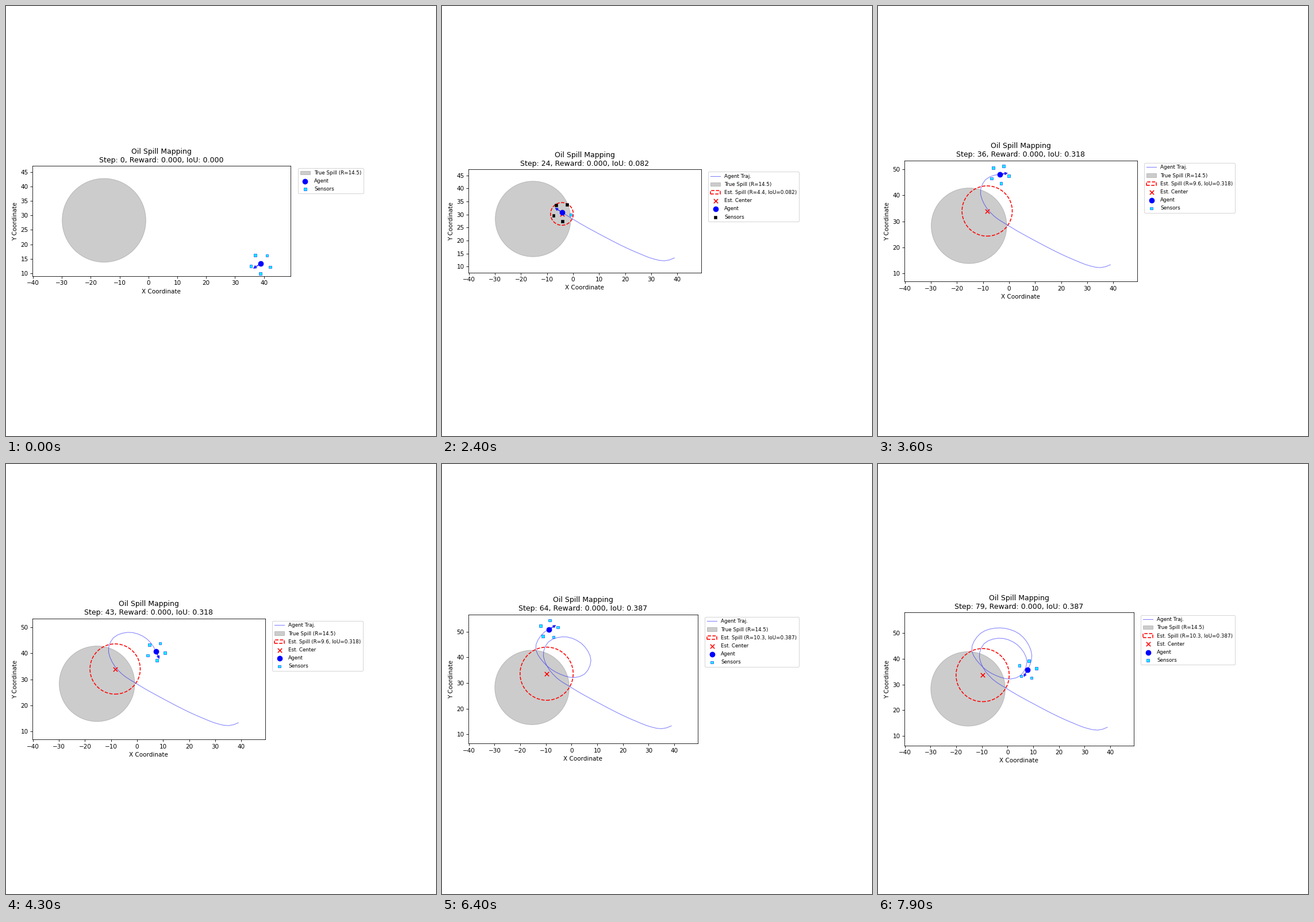
A matplotlib script for the animation above (8 s loop, 748 by 748 pixels).

```python
import numpy as np
import matplotlib.pyplot as plt
from matplotlib.animation import FuncAnimation
from matplotlib.patches import Circle

STEPS = 80
SPILL, SPILL_R = np.array([-15.4, 28.3]), 14.5
SENSOR_R = 3.5
SENSOR_ANGLES = -np.pi / 2 + 2 * np.pi * np.arange(5) / 5
START_HEADING = np.radians(214)

# Key points of the agent's route: approach, inner loop, outer loop.
ROUTE = np.array([
    (38.87, 13.34), (35, 12.23), (31, 12.92), (25.05, 15.17), (9.7, 22.7),
    (0, 28.2), (-6.2, 32.4), (-9.5, 36.5), (-11, 41.6), (-9.25, 45.8),
    (-3.1, 48.05), (4.4, 44.95), (7.55, 38.75), (4.85, 33.35), (1.2, 32.15),
    (-4.4, 33.45), (-10, 37.1), (-14, 44), (-10.5, 49.95), (-3.5, 52.05),
    (5, 49.4), (9.45, 40.9), (7.75, 35.75),
])

# Estimate: grows while the spill is crossed, then jumps on re-entry.
EST_STEPS = [22, 30, 57, 58]
EST_X = [-2.93, -8.42, -8.45, -9.72]
EST_Y = [29.0, 33.97, 33.96, 33.66]
EST_R = [2.6, 9.64, 9.64, 10.34]


def arc_length(points):
    return np.r_[0, np.cumsum(np.hypot(*np.diff(points, axis=0).T))]


def spline(points, samples=4000):
    """Cubic Hermite curve through the points, by chord length."""
    t = arc_length(points)
    slope = np.gradient(points, t, axis=0, edge_order=2)
    u = np.linspace(0, t[-1], samples)
    i = np.clip(np.searchsorted(t, u, "right") - 1, 0, len(t) - 2)
    h = (t[i + 1] - t[i])[:, None]
    s = (u - t[i])[:, None] / h
    return ((1 + 2 * s) * (1 - s) ** 2 * points[i]
            + s * (1 - s) ** 2 * h * slope[i]
            + s ** 2 * (3 - 2 * s) * points[i + 1]
            + s ** 2 * (s - 1) * h * slope[i + 1])


def even_steps(curve, count):
    """Points at constant speed along the curve."""
    dist = arc_length(curve)
    at = np.linspace(0, dist[-1], count)
    return np.stack([np.interp(at, dist, axis) for axis in curve.T], axis=1)


path = even_steps(spline(ROUTE), STEPS)
moves = np.diff(path, axis=0)
headings = np.r_[START_HEADING, np.arctan2(moves[:, 1], moves[:, 0])]


def unit(angle):
    return np.stack([np.cos(angle), np.sin(angle)], axis=-1)


def overlap(center, r):
    """IoU of the spill and a circle that crosses its edge."""
    d = np.hypot(*(center - SPILL))

    def segment(a, b):
        cos = np.clip((d * d + a * a - b * b) / (2 * d * a), -1, 1)
        return a * a * (np.arccos(cos) - cos * np.sqrt(1 - cos * cos))

    shared = segment(SPILL_R, r) + segment(r, SPILL_R)
    return shared / (np.pi * (SPILL_R ** 2 + r ** 2) - shared)


def estimate(step):
    x, y, r = (np.interp(step, EST_STEPS, v) for v in (EST_X, EST_Y, EST_R))
    center = np.array([x, y])
    return center, r, overlap(center, r)


def set_limits(ax, trail):
    low = np.minimum(trail.min(axis=0), SPILL - SPILL_R)
    high = np.maximum(trail.max(axis=0), SPILL + SPILL_R)
    pad = 0.15 * (high - low)
    ax.set_xlim(low[0] - pad[0], high[0] + pad[0])
    ax.set_ylim(low[1] - pad[1], high[1] + pad[1])
    ax.set_aspect("equal", adjustable="box")


def draw(step):
    fig.clear()
    fig.subplots_adjust(left=0.125, right=0.9, bottom=0.11, top=0.88)
    ax = fig.add_subplot()
    trail = path[:step + 1]
    pos, heading = path[step], headings[step]

    if step:
        ax.plot(*trail.T, "b-", lw=1, alpha=0.5, label="Agent Traj.")
    ax.add_patch(Circle(SPILL, SPILL_R, color="gray", alpha=0.4,
                        label=f"True Spill (R={SPILL_R})"))

    iou = 0
    if step >= EST_STEPS[0]:
        center, r, iou = estimate(step)
        ax.add_patch(Circle(center, r, color="red", fill=False, ls="--",
                            lw=1.5,
                            label=f"Est. Spill (R={r:.1f}, IoU={iou:.3f})"))
        ax.scatter(*center, marker="x", c="red", s=50, zorder=3,
                   label="Est. Center")

    ax.scatter(*pos, c="blue", s=70, zorder=5, label="Agent")
    ax.arrow(*pos, *(2 * unit(heading)), head_width=1, head_length=1,
             fc="blue", ec="blue", alpha=0.8, zorder=4)

    sensors = pos + SENSOR_R * unit(heading + SENSOR_ANGLES)
    inside = np.hypot(*(sensors - SPILL).T) <= SPILL_R
    ax.scatter(*sensors.T, marker="s", s=20, lw=0.5, zorder=5,
               c=np.where(inside, "black", "cyan"),
               edgecolors=np.where(inside, "black", "blue"), label="Sensors")

    set_limits(ax, trail)
    ax.set_xlabel("X Coordinate")
    ax.set_ylabel("Y Coordinate")
    ax.set_title("Oil Spill Mapping\n"
                 f"Step: {step}, Reward: 0.000, IoU: {iou:.3f}")
    ax.legend(loc="upper left", bbox_to_anchor=(1.02, 1),
              fontsize=8.4, labelspacing=0.59)
    fig.tight_layout(rect=[0, 0, 0.85, 1])


fig = plt.figure(figsize=(10, 10), dpi=74.8)
anim = FuncAnimation(fig, draw, frames=STEPS, interval=100,
                     repeat=True, repeat_delay=0)
plt.show()
```
